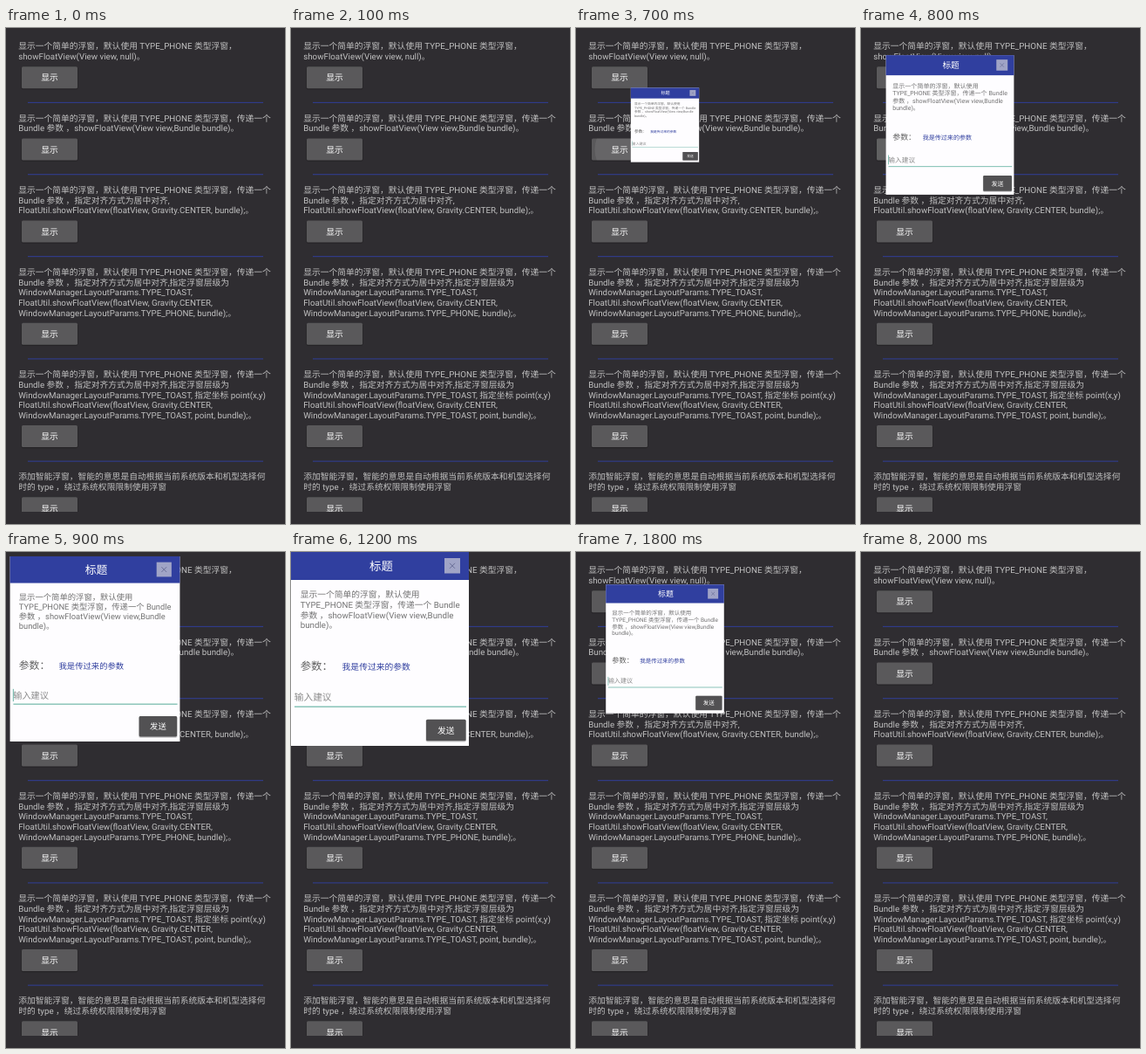
An HTML page for the animation above (2.3 s loop, 320 px wide and 568 px high).

```html
<!DOCTYPE html>
<html lang="zh-CN">
<head>
<meta charset="utf-8">
<title>浮窗</title>
<style>
  html, body { margin: 0; width: 100%; height: 100%; overflow: hidden; background: #2f2d31; }
  svg { display: block; width: 320px; height: 568px; }
  text {
    font: 9.78px Roboto, "Noto Sans CJK SC", "Noto Sans SC", sans-serif;
    text-rendering: geometricPrecision;
    white-space: pre;
  }
</style>
</head>
<body>
<svg viewBox="0 0 320 568">
  <defs>
    <clipPath id="scroll"><rect width="320" height="554"/></clipPath>
    <clipPath id="pressed"><rect x="18" y="126.4" width="64" height="25" rx="1.5"/></clipPath>
  </defs>
  <rect width="320" height="568" fill="#2f2d31"/>
  <g id="list" clip-path="url(#scroll)"></g>
  <g clip-path="url(#pressed)"><circle id="ripple" cx="58" cy="139" fill="#fff"/></g>
  <g id="popup"></g>
</svg>
<script>
const $ = id => document.getElementById(id);
const list = $('list'), popup = $('popup'), ripple = $('ripple');
const LINE = 11.65, LOOP = 2300, STEP = 100;

function add(parent, tag, attrs, label) {
  const el = document.createElementNS('http://www.w3.org/2000/svg', tag);
  for (const k in attrs) el.setAttribute(k, attrs[k]);
  if (label) el.textContent = label;
  parent.append(el);
  return el;
}

function rect(parent, x, y, width, height, fill, rx = 0) {
  return add(parent, 'rect', { x, y, width, height, fill, rx });
}

function text(parent, x, y, label, fill, size = 9.78, anchor = 'start') {
  const el = add(parent, 'text', { x, y, fill, 'text-anchor': anchor }, label);
  el.style.fontSize = size + 'px';
}

function paragraph(parent, x, y, lines, fill) {
  lines.forEach((line, i) => text(parent, x, y + i * LINE, line, fill));
}

function button(parent, cx, cy, w, h, label, fill) {
  const x = cx - w / 2, y = cy - h / 2;
  add(parent, 'rect', { x: x - .5, y: y + .3, width: w + 1, height: h + 1, rx: 2, fill: '#000', opacity: .22 });
  rect(parent, x, y, w, h, fill, 1.5);
  text(parent, cx, cy + 3.7, label, '#fff', 9.78, 'middle');
}

const intro = '显示一个简单的浮窗，默认使用 TYPE_PHONE 类型浮窗，';
const more = intro + '传递一个';
const align = 'Bundle 参数 ，指定对齐方式为居中对齐,';
const level = align + '指定浮窗层级为';
const call = 'FloatUtil.showFloatView(floatView, Gravity.CENTER,';
const params = 'WindowManager.LayoutParams.';

const items = [
  [intro, 'showFloatView(View view, null)。'],
  [more, 'Bundle 参数 ，showFloatView(View view,Bundle bundle)。'],
  [more, align, call + ' bundle);。'],
  [more, level, params + 'TYPE_TOAST,', call, params + 'TYPE_PHONE, bundle);。'],
  [more, level, params + 'TYPE_TOAST, 指定坐标 point(x,y)', call, params + 'TYPE_TOAST, point, bundle);。'],
  ['添加智能浮窗，智能的意思是自动根据当前系统版本和机型选择何', '时的 type ，绕过系统权限限制使用浮窗']
];

let baseline = 24.4;
for (const lines of items) {
  paragraph(list, 14.2, baseline, lines, '#c1c1c1');
  const cy = baseline + (lines.length - 1) * LINE + 20.7;
  button(list, 50, cy, 64, 25, '显示', '#5a595b');
  rect(list, 25, cy + 28.1, 270, 1.1, '#303c8f');
  baseline = cy + 49.95;
}

rect(popup, 0, 0, 204, 222, '#fefdff');
rect(popup, 0, 0, 204, 32, '#303f9f');
text(popup, 103.5, 20.8, '标题', '#fff', 13.4, 'middle');
rect(popup, 176, 7, 18, 17.5, '#a0a4c6');
add(popup, 'path', { d: 'M182 12.8l6 6m0-6l-6 6', stroke: '#686d96', 'stroke-width': 1, fill: 'none' });
paragraph(popup, 10.7, 52.4, [
  '显示一个简单的浮窗，默认使用',
  'TYPE_PHONE 类型浮窗，传递一个 Bundle',
  '参数 ，showFloatView(View view,Bundle',
  'bundle)。'
], '#737373');
text(popup, 10.7, 134.8, '参数：', '#606060', 12.4);
text(popup, 58.6, 134.7, '我是传过来的参数', '#303f9f');
text(popup, 3.8, 170.2, '输入建议', '#8a8a8a', 10.7);
rect(popup, 4, 176.5, 197, 1.4, '#80bfb3');
const caret = rect(popup, 3.4, 159, 1.3, 15, '#80bfb3');
button(popup, 177.8, 204, 45.5, 24.5, '发送', '#525153');

const ease = x => (1 - Math.cos(Math.PI * Math.min(1, Math.max(0, x)))) / 2;

function scaleAt(t) {
  return t < 1800 ? ease((t - 506) / 456) : 1 - ease((t - 1682) / 300);
}

function draw(now) {
  const t = Math.floor(now % LOOP / STEP) * STEP;
  const s = scaleAt(t);
  popup.setAttribute('visibility', s > 0 ? 'visible' : 'hidden');
  popup.setAttribute('transform', `translate(102 111) scale(${s}) translate(-102 -111)`);
  caret.setAttribute('opacity', t >= 1200 && t < 1700 ? 0 : 1);

  const age = t - 600;
  const lit = age >= 0 && age < 300;
  ripple.setAttribute('r', lit ? 20.5 + age * .16 : 0);
  ripple.setAttribute('opacity', lit ? .1 - age * .0003 : 0);
}

function tick() {
  draw(performance.now());
  requestAnimationFrame(tick);
}
tick();
</script>
</body>
</html>
```
